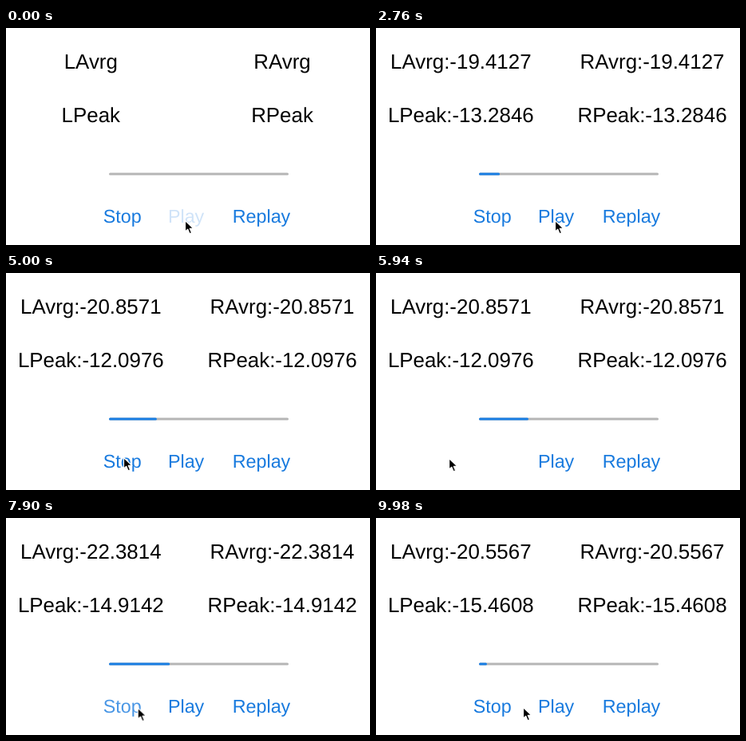
An HTML page for the animation above (10 s loop, 456x272 px).

```html
<!DOCTYPE html>
<html lang="en">
<head>
<meta charset="utf-8">
<title>Audio level meter</title>
<style>
  html, body { margin: 0; width: 100%; height: 100%; overflow: hidden; background: #fff; }
  svg { display: block; width: 456px; height: 272px; }
  text { font-family: "Liberation Sans", Arial, sans-serif; text-anchor: middle; text-rendering: geometricPrecision; }
  .label { font-size: 25.9px; fill: #000; }
  .button { font-size: 23.3px; fill: #187ade; }
  .track { fill: #b5b5b5; }
  .fill { fill: #187ee4; animation: progress 10s ease-in-out infinite; }
  .cursor { animation: move 10s ease-in-out infinite; }
  .stop { animation: stop 10s linear infinite; }
  .play { animation: play 10s linear infinite; }
  .replay { animation: replay 10s linear infinite; }

  @keyframes progress {
    0%, 10.6% { width: 0; }
    20%, 21.2% { width: 13px; }
    30.8%, 32% { width: 30px; }
    41.8%, 42.8% { width: 46px; }
    52.4%, 65.2% { width: 62px; }
    75.2%, 75.4% { width: 70px; }
    85%, 86.2% { width: 91px; }
    92.5% { width: 104px; }
    92.51%, 96.4% { width: 0; }
    99.8%, 100% { width: 10px; }
  }
  @keyframes move {
    0%, 32.2% { transform: translate(224px, 241px); }
    37.8% { transform: translate(202px, 236px); }
    41.8%, 53.2% { transform: translate(147px, 231px); }
    60.6%, 65.2% { transform: translate(88px, 232px); }
    68% { transform: translate(108px, 243px); animation-timing-function: linear; }
    70.6% { transform: translate(127px, 238px); }
    75.4% { transform: translate(140px, 238px); }
    85%, 86.2% { transform: translate(224px, 237px); animation-timing-function: linear; }
    88.6% { transform: translate(238px, 236px); }
    91.5%, 94% { transform: translate(318px, 237px); }
    99.8%, 100% { transform: translate(184px, 237px); }
  }
  @keyframes play {
    0%, 10.6% { opacity: .2; }
    15%, 100% { opacity: 1; }
  }
  @keyframes stop {
    0%, 53.2% { opacity: 1; }
    59%, 75.4% { opacity: 0; }
    80%, 100% { opacity: 1; }
  }
  @keyframes replay {
    0%, 92% { opacity: 1; }
    92.5%, 93.5% { opacity: .2; }
    97.5%, 100% { opacity: 1; }
  }
</style>
</head>
<body>
<svg viewBox="0 0 456 272">
  <text class="label" x="106.3" y="51" data-name="LAvrg">LAvrg</text>
  <text class="label" x="346" y="51" data-name="RAvrg">RAvrg</text>
  <text class="label" x="106.3" y="118" data-name="LPeak">LPeak</text>
  <text class="label" x="346" y="118" data-name="RPeak">RPeak</text>

  <rect class="track" x="129" y="181.4" width="225" height="3.1" rx="1.5"/>
  <rect class="fill" x="129" y="181.4" width="0" height="3.1" rx="1.5"/>

  <text class="button stop" x="145.7" y="244">Stop</text>
  <text class="button play" x="225.6" y="244">Play</text>
  <text class="button replay" x="320" y="244">Replay</text>

  <g class="cursor">
    <path d="M.5 .5V14.3L3.7 11.3L6 16.8L8.6 15.7L6.3 10.4H10.8Z"
          fill="#000" stroke="#fff" stroke-width="1.2" stroke-linejoin="round"/>
  </g>
</svg>
<script>
  const LOOP = 10000;
  // start time in ms, average level, peak level
  const readings = [
    [0],
    [1060, "-18.2989", "-15.4608"],
    [2120, "-19.4127", "-13.2846"],
    [3200, "-20.7215", "-12.621"],
    [4280, "-20.8571", "-12.0976"],
    [6520, "-24.6932", "-13.4294"],
    [7540, "-22.3814", "-14.9142"],
    [8620, "-21.5536", "-17.0218"],
    [9640, "-20.5567", "-15.4608"]
  ];
  const labels = document.querySelectorAll(".label");
  let start, shown;

  function tick(now) {
    start ??= now;
    const time = (now - start) % LOOP;
    const reading = readings.findLast(([from]) => from <= time);
    if (reading !== shown) {
      const [, average, peak] = shown = reading;
      for (const label of labels) {
        const { name } = label.dataset;
        const level = name.endsWith("Avrg") ? average : peak;
        label.textContent = level ? `${name}:${level}` : name;
      }
    }
    requestAnimationFrame(tick);
  }
  requestAnimationFrame(tick);
</script>
</body>
</html>
```
